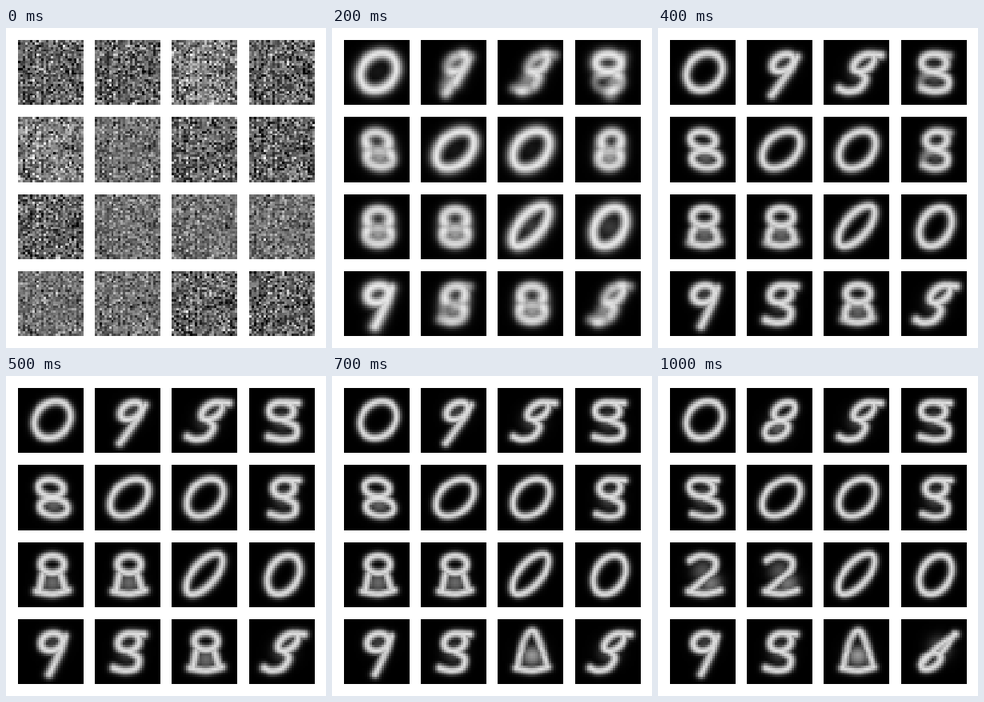
Write an HTML page with a canvas that moves like this. It is 400 px wide and 400 px high and loops after 1.1 s.

```html
<!DOCTYPE html>
<html lang="en">
<head>
<meta charset="utf-8">
<title>Generated digits by epoch</title>
<style>
  html, body { margin: 0; width: 100%; height: 100%; overflow: hidden; background: #fff; }
  canvas { display: block; }
</style>
</head>
<body>
<canvas id="stage" width="400" height="400"></canvas>
<script>
const GRID = 28, CELL = 82, STEP_MS = 100, STEPS = 11;
const KEYS = [1, 3, 5, 7, 9, 10];
const WEIGHTS = [15, 11, 9.5];

// Shapes in a unit box, later fitted to each tile
const line = (...flat) => ({ points: curve(flat) });
const ring = (cx, cy, rx, ry) => ({ points: ellipse(cx, cy, rx, ry) });
const haze = (x, y, ink, width = 22) => ({ points: [[x, y]], ink, width });
const hole = (x, y) => ({ points: [[x, y]], ink: 0.4, width: 10, dark: true });

function ellipse(cx, cy, rx, ry, angle = 0) {
  const turn = angle * Math.PI / 180, cos = Math.cos(turn), sin = Math.sin(turn);
  return Array.from({ length: 90 }, (_, i) => {
    const a = i / 45 * Math.PI;
    const x = rx * Math.cos(a), y = ry * Math.sin(a);
    return [cx + x * cos - y * sin, cy + x * sin + y * cos];
  });
}

// Catmull-Rom curve through the given points
function curve(flat) {
  const knots = [];
  for (let i = 0; i < flat.length; i += 2) knots.push([flat[i], flat[i + 1]]);
  const last = knots.length - 1, points = [knots[0]];
  for (let i = 0; i < last; i++) {
    const p = knots[Math.max(i - 1, 0)], q = knots[i];
    const r = knots[i + 1], s = knots[Math.min(i + 2, last)];
    for (let t = 0.1; t < 1.01; t += 0.1) {
      points.push([0, 1].map(d => q[d] + ((r[d] - p[d]) * t
        + (2 * p[d] - 5 * q[d] + 4 * r[d] - s[d]) * t * t
        + (3 * q[d] - p[d] - 3 * r[d] + s[d]) * t * t * t) / 2));
    }
  }
  return points;
}

const base = line(-1, 0.85, 0, 1, 1, 0.8);
const topLoop = ring(-0.1, -0.5, 0.75, 0.45);

const glyphs = {
  blob: [ring(0, 0, 0.75, 0.8), haze(0, 0.4, 0.92, 24), hole(0, -0.45)],
  slash: [line(0.2, -0.9, 0, 0, -0.1, 0.9), line(-0.2, -0.6, -0.2, 0.7), line(0.4, -0.7, 0.4, 0.5), hole(-0.1, -0.45)],
  eight: [ring(0, -0.5, 0.75, 0.45), ring(0, 0.5, 0.85, 0.45), haze(0, 0.3, 0.42)],
  five: [topLoop, line(0.2, -0.95, 0.95, -0.9), line(0, 0, 0.8, 0.35, 0.75, 0.85, 0, 1, -0.9, 0.85), haze(0, 0, 0.32)],
  nine: [topLoop, line(0.8, -0.8, 0.6, 0, 0.1, 1.2), haze(0, -0.4, 0.25)],
  bell: [ring(0, -0.55, 0.7, 0.45), base, line(-0.6, 0, -0.8, 0.8), line(0.5, 0, 0.8, 0.8), haze(0, 0.4, 0.45)],
  two: [line(-0.9, -0.75, -0.2, -1, 0.6, -0.8, 0.6, -0.3, 0, 0.2, -0.8, 0.8), base, haze(-0.1, -0.2, 0.35), haze(0.4, 0.45, 0.5)],
  cone: [line(-0.9, 0.8, -0.5, -0.5, 0, -1.1, 0.4, -0.6, 0.95, 0.8), base, haze(0, 0.2, 0.65), hole(-0.1, -0.5)],
  six: [line(0.9, -0.9, -0.1, -0.2, -0.6, 0.7), ring(0.1, 0.5, 0.75, 0.42), line(0.8, -0.9, 0.5, 0.2), haze(0.2, -0.2, 0.4)]
};

const last = list => list[list.length - 1];

// A digit morphing through the named glyphs, one per key step
function digit(cx, half, slant, names) {
  const order = names.split(" ");
  return KEYS.map((_, k) => (glyphs[order[k] || last(order)]).map(shape => ({
    ...shape,
    points: shape.points.map(([x, y]) => [cx + x * half - y * slant, 41 + y * 24])
  })));
}

// A tilted zero whose hole clears after the first key step
function zero(cx, cy, rx, ry, angle, fill = 0.18) {
  const outline = { points: ellipse(cx, cy, rx, ry, angle) };
  return KEYS.map((_, k) => k ? [outline] : [outline, haze(cx, cy, fill)]);
}

const tiles = [
  zero(43, 40, 25, 20.5, -48),
  digit(42, 16, 10, "slash nine nine nine nine eight"),
  digit(45, 15, 14, "slash five"),
  digit(42, 20, 0, "nine eight five"),

  digit(43, 20, -4, "blob eight eight eight five"),
  zero(43, 41, 27.5, 18.5, -42),
  zero(42, 41, 26.5, 19, -47),
  digit(44, 17, 2, "blob eight five"),

  digit(43, 20, 0, "blob eight bell bell bell two"),
  digit(43, 20, 0, "blob eight bell bell bell two"),
  zero(41, 40, 31, 14, -50, 0.45),
  zero(43, 41, 26, 18, -60, 0.5),

  digit(42, 17, 4, "nine"),
  digit(42, 17, 4, "blob five"),
  digit(43, 20, 0, "blob eight bell cone"),
  digit(43, 14, 14, "slash five five five six")
];

function render(shapes, key) {
  const pixels = new Float32Array(GRID * GRID);
  const weight = WEIGHTS[key] || 9;
  for (const { points, ink = key ? 0.95 : 1.03, width = weight, dark } of shapes) {
    for (let i = 0; i < pixels.length; i++) {
      const x = (i % GRID + 0.5) * CELL / GRID;
      const y = (Math.floor(i / GRID) + 0.5) * CELL / GRID;
      let near = Infinity;
      for (const [px, py] of points) near = Math.min(near, (px - x) ** 2 + (py - y) ** 2);
      const value = ink / (1 + Math.exp((Math.sqrt(near) - width / 2) / (width * 0.2)));
      pixels[i] = dark ? pixels[i] * (1 - value) : Math.max(pixels[i], value * 255);
    }
  }
  return pixels;
}

const poses = tiles.map(tile => tile.map(render));

let seed = 77;
function random() {
  seed = (seed * 1664525 + 1013904223) >>> 0;
  return seed / 2 ** 32;
}
const field = () => Float32Array.from({ length: GRID * GRID }, () => (random() + random() + random() - 1.5) * 2);

// Untrained output: a common pattern plus each tile's own grain
const common = field();
const noise = tiles.map((_, n) => {
  const calm = [5, 9, 10, 11, 12, 13].includes(n);
  const mean = calm ? 110 : n === 2 || n === 4 ? 122 : 95;
  const spread = calm ? 36 : 50;
  return field().map((v, i) => {
    const streak = Math.sin(i % GRID * 2.4) * 0.35;
    return mean + spread * (0.7 * common[i] + 0.6 * v + streak);
  });
});

function pixelsAt(n, step) {
  if (step === 0) return noise[n];
  const k = KEYS.findIndex(key => key >= step);
  const to = poses[n][k];
  if (KEYS[k] === step) return to;
  const from = poses[n][k - 1];
  const mix = (step - KEYS[k - 1]) / (KEYS[k] - KEYS[k - 1]);
  return from.map((v, i) => v + (to[i] - v) * mix);
}

const ctx = document.getElementById("stage").getContext("2d");
const tileCanvas = document.createElement("canvas");
tileCanvas.width = tileCanvas.height = GRID;
const tileCtx = tileCanvas.getContext("2d");
const image = tileCtx.createImageData(GRID, GRID);

function draw(step) {
  ctx.fillStyle = "#fff";
  ctx.fillRect(0, 0, 400, 400);
  ctx.imageSmoothingEnabled = false;
  tiles.forEach((_, n) => {
    const col = n % 4, row = n >> 2;
    pixelsAt(n, step).forEach((v, i) => {
      image.data.fill(v, i * 4, i * 4 + 3);
      image.data[i * 4 + 3] = 255;
    });
    tileCtx.putImageData(image, 0, 0);
    const x = Math.floor(15 + col * 96.34), y = Math.round(15 + row * 96.34);
    ctx.drawImage(tileCanvas, x, y, CELL, row === 1 ? CELL : CELL - 1);
  });
}

let shown = -1;
function tick() {
  const step = Math.floor(performance.now() / STEP_MS) % STEPS;
  if (step !== shown) draw(shown = step);
  requestAnimationFrame(tick);
}
tick();
</script>
</body>
</html>
```
